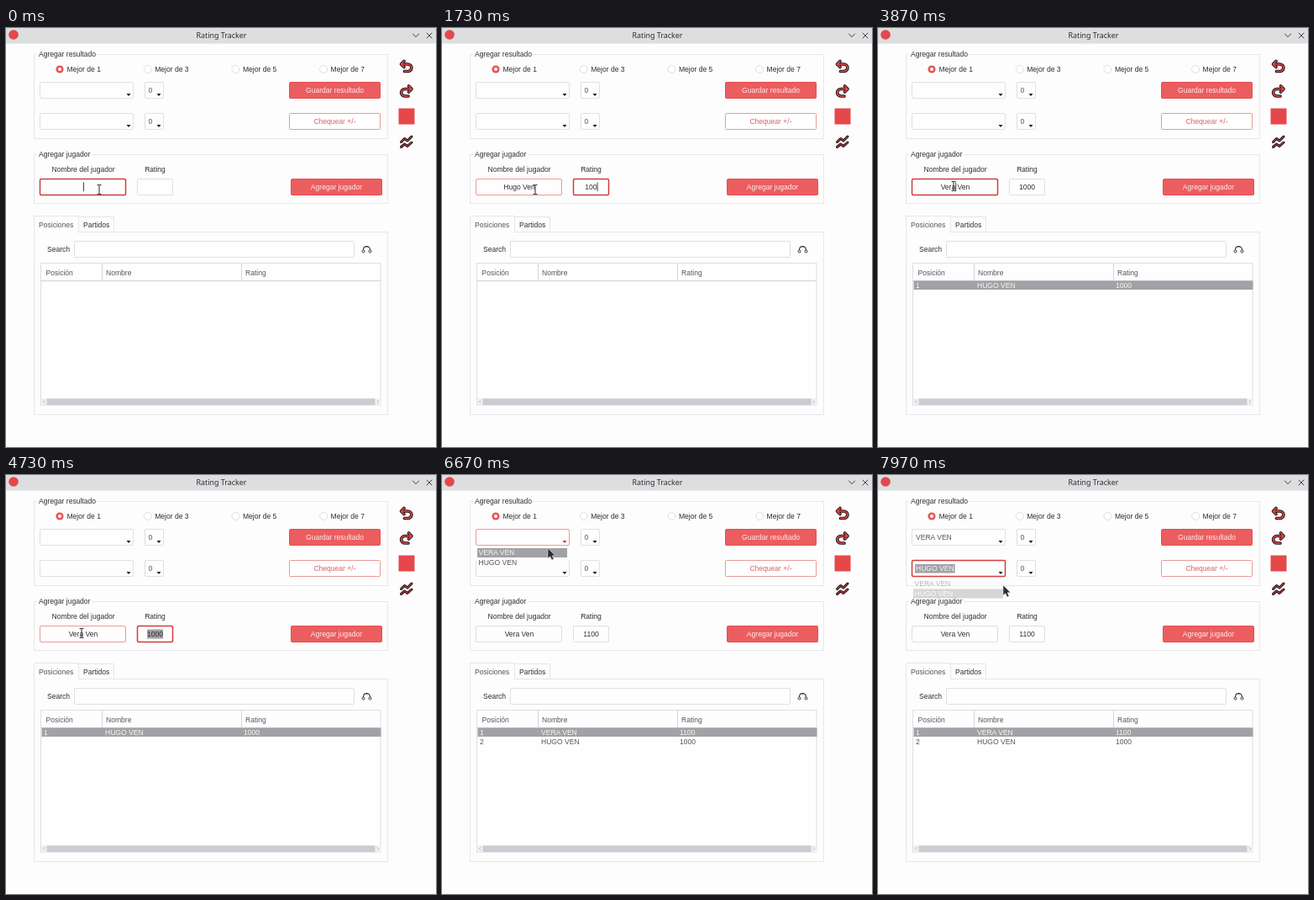
Write an HTML page that moves like this. It is 512 by 498 pixels and loops after 8 s.

```html
<!DOCTYPE html>
<html lang="es">
<head>
<meta charset="utf-8">
<title>Rating Tracker</title>
<style>
html, body { margin: 0; width: 100%; height: 100%; overflow: hidden; background: #fdfdfd; }
svg { display: block; width: 100vw; height: 100vh; }
text { font: 8.55px "Liberation Sans", Arial, sans-serif; fill: #2e2e31; white-space: pre; }
.title { font: 8.9px "Noto Sans", sans-serif; }
.mid { text-anchor: middle; }
.soft { fill: #56565a; }
.inv { fill: #f7f7f8; }
.back { fill: #fdfdfd; }
.line { fill: none; stroke: #e6e6ec; }
.box { fill: #fefefe; stroke: #dfdfe5; }
.hot { fill: #ec5d5f; stroke: #e24f52; }
.sel { fill: #a2a2a6; }
.icon { fill: none; stroke-linecap: round; stroke-linejoin: round; }
</style>
</head>
<body>
<svg id="stage" viewBox="0 0 512 498" preserveAspectRatio="none"></svg>
<script>
const LOOP = 8000;
const ONE = "Hugo Ven", TWO = "Vera Ven";
const ADD_ONE = 2250, ADD_TWO = 6120;
const INK = "#2e2e31", RED = "#e5484b", FOCUS = "#d23c3a", HOVER = "#ea9a98";

const rect = (x, y, w, h, cls, extra = "") =>
  `<rect x="${x}" y="${y}" width="${w}" height="${h}" class="${cls}" ${extra}/>`;
const label = (x, y, s, cls = "", extra = "") =>
  `<text x="${x}" y="${y}" class="${cls}" ${extra}>${s}</text>`;
const path = (d, color, width, extra = "") =>
  `<path class="icon" d="${d}" stroke="${color}" stroke-width="${width}" ${extra}/>`;
const outlined = (d, width) => path(d, "#241416", width + 2) + path(d, RED, width);
const arrow = (x, y, id = "") =>
  `<path id="${id}" d="M${x - 2.5} ${y - 1.5}h5l-2.5 3z" fill="#1c1c1e"/>`;

const group = (y, h, title, w) =>
  rect(33.5, y + .5, 421, h, "line") + rect(37, y - 3, w + 4, 8, "back") +
  label(39, y + 3, title);
const radio = (x, n) => n === 1
  ? `<circle cx="${x}" cy="49" r="4.6" fill="#e95558"/><circle cx="${x}" cy="49" r="2" fill="#fff"/>`
  : `<circle cx="${x}" cy="49" r="4.5" class="box"/>`;
const radios = [1, 3, 5, 7].map((n, i) => {
  const x = 64 + i * 104.7;
  return radio(x, n) + label(x + 8.5, 52, "Mejor de " + n);
}).join("");
const combo = (id, y) =>
  rect(40.5, y + .5, 111, 19, "box", `rx="1.5" id="${id}"`) + arrow(146, y + 15.5, id + "Arrow") +
  rect(44, y + 5, 0, 10.5, "sel", `id="${id}Sel"`) + label(45, y + 13, "", "", `id="${id}Text"`) +
  rect(165.5, y + .5, 22, 19, "box", 'rx="1.5"') + label(169.5, y + 13, "0", "soft") + arrow(182, y + 15.5);
const field = (id, x, w) =>
  rect(x + .5, 179.5, w, 19, "box", `rx="1.5" id="${id}"`) +
  rect(0, 183.5, 0, 11, "sel", `id="${id}Sel"`) +
  label(0, 192, "", "", `id="${id}Text"`) +
  rect(0, 183.5, .9, 10.5, "", `id="${id}Caret" fill="${INK}"`);
const button = (x, y, s, cls, color, id = "") =>
  rect(x + .5, y + .5, 108, 19, cls, `rx="1" id="${id}"`) +
  label(x + 54.5, y + 13, s, "mid", `style="fill:${color}"`);
const row = (id, y) => `<g id="${id}">` +
  [45, 118, 283].map(x => label(x, y, "")).join("") + "</g>";
const popup = (id, y) => `<g id="${id}">` +
  rect(41, y, 109, 25, "back") + rect(42, y + 1, 107, 11, "sel") +
  label(43.5, y + 9, TWO.toUpperCase()) + label(43.5, y + 20.5, ONE.toUpperCase()) + "</g>";
const node = x => `<circle cx="${x}" cy="265.5" r="1.5" fill="#fefefe" stroke="${INK}"/>`;

document.getElementById("stage").innerHTML =
  rect(0, 0, 512, 498, "back") +
  rect(0, 0, 512, 18.5, "", 'fill="#dcdee0"') +
  `<circle cx="9" cy="8" r="5.8" fill="${RED}"/>` +
  label(256.5, 12.3, "Rating Tracker", "title mid") +
  path("M484.5 7l3.5 3.7 3.5-3.7M501 6l6 6M507 6l-6 6", "#404044", 1) +

  group(31, 100, "Agregar resultado", 67) + radios +
  combo("c1", 64) + combo("c2", 101) +
  button(337, 64, "Guardar resultado", "hot", "#fdeeee") +
  button(337, 101, "Chequear +/-", "box", "#dc6264", "check") +

  group(150, 58, "Agregar jugador", 61) +
  label(92, 170.5, "Nombre del jugador", "mid") + label(177.5, 170.5, "Rating", "mid") +
  field("name", 40, 102) + field("rating", 156, 42) +
  button(339, 179, "Agregar jugador", "hot", "#fdeeee", "add") +

  rect(33.5, 242.5, 421, 217, "line") +
  rect(86.5, 224.5, 42, 18, "line") +
  rect(33.5, 223.5, 53, 19.5, "line", 'style="fill:#fdfdfd"') +
  rect(34, 242, 52, 2, "back") +
  label(39, 236.5, "Posiciones", "soft") + label(92, 236.5, "Partidos") +
  label(49, 266, "Search") + rect(81.5, 253.5, 333, 19, "box", 'rx="1.5"') +
  path("M425.5 264c0-6 7.5-6 8 0M428 260h3", INK, 1.1) + node(425.5) + node(433.5) +
  rect(41.5, 279.5, 404.5, 169, "box") + path("M41.5 300.5h404.5M114.5 280v20M280.5 280v20", "#d3d3d9", 1) +
  ["Posición", "Nombre", "Rating"].map((s, i) => label([47.5, 119, 285][i], 294, s, "soft")).join("") +
  rect(42.5, 300.5, 404, 10.5, "sel", 'id="rowSel"') + row("row1", 309) + row("row2", 320) +
  rect(42, 440, 404, 8.5, "", 'fill="#f1f2f3"') + rect(48.5, 440.5, 391, 7.5, "", 'fill="#c9ccd0"') +
  path("M46 442.5l-1.6 1.7 1.6 1.7M442 442.5l1.6 1.7-1.6 1.7", "#a8aab0", .8) +

  outlined("M474 39.5l-3.5 3.5 3.5 3.5M471 43h7c6.5 0 6.5 8.5 0 8.5h-3.5", 1.7) +
  outlined("M479.500 69l3.5 3.5-3.5 3.5M482.5 72.5h-7c-6.5 0-6.5 8.500 0 8.500h3.5".replace(/00\b/g, ""), 1.7) +
  rect(467.5, 95.5, 19, 19, "", `fill="${RED}"`) +
  outlined("M470.5 135.5l4-4 3.5 2.5 5-5M470.5 141.5l4-3.5 3.5 2.5 5-4.5", 1) +

  popup("pop1", 86) + popup("pop2", 123) +
  path("M-2 -5.5h1.5l.5 .5 .5-.5h1.5M0 -5v10M-2 5.5h1.5l.5-.5 .5 .5h1.5", "#242427", 1, 'id="beam"') +
  '<path id="arrow" d="M0 0v12l2.8-2.3 2 4.2 2.2-1-1.9-4.1h3.7z" fill="#2c2c30" stroke="#f4f4f6" stroke-width=".5"/>';

const el = {};
document.querySelectorAll("[id]").forEach(e => el[e.id] = e);
const set = (e, attrs) => { for (const k in attrs) e.setAttribute(k, attrs[k]); };
const show = (e, on) => { e.style.display = on ? "" : "none"; };
const typed = (s, start, step, t) => s.slice(0, Math.max(0, Math.floor((t - start) / step) + 1));

// Each entry is [from time, control holding the keyboard].
const focusSteps = [[0, "name"], [1250, "rating"], [2050, "add"], [2950, "name"],
  [4250, "rating"], [5980, "add"], [6400, "c1"], [7250, "c2"]];

// Pointer stops: time, x, y.
const stops = [[0, 111, 192], [2480, 111, 192], [2740, 97, 186], [2950, 88, 188], [3300, 90, 188],
  [5330, 90, 188], [5840, 229, 165], [5960, 229, 165], [6350, 128, 77], [6480, 128, 77], [6640, 126, 87],
  [6900, 126, 88], [7180, 146, 112], [7350, 146, 112], [7650, 149, 139], [7840, 149, 138], [7950, 149, 131]];

function pointerAt(t) {
  const i = stops.findIndex(s => s[0] > t);
  if (i < 0) return stops[stops.length - 1].slice(1);
  const a = stops[i - 1], b = stops[i];
  let k = (t - a[0]) / (b[0] - a[0]);
  k = k * k * (3 - 2 * k);
  return [a[1] + (b[1] - a[1]) * k, a[2] + (b[2] - a[2]) * k];
}

function drawField(id, cx, value, caretPos, selLen, caretOn) {
  const text = el[id + "Text"];
  text.textContent = value;
  const width = n => n ? text.getSubStringLength(0, n) : 0;
  const left = cx - width(value.length) / 2;
  set(text, { x: left });
  set(el[id + "Sel"], { x: left, width: width(selLen) });
  set(el[id + "Caret"], { x: left + width(caretPos) });
  show(el[id + "Caret"], caretOn && !selLen);
}

function border(id, focused, light) {
  el[id].style.stroke = light ? HOVER : focused ? FOCUS : "";
  el[id].style.strokeWidth = focused && !light ? 1.5 : 1;
}

function drawRow(id, values, selected) {
  show(el[id], values);
  if (!values) return;
  [...el[id].children].forEach((e, i) => {
    e.textContent = values[i];
    e.setAttribute("class", selected ? "inv" : "soft");
  });
}

function drawPopup(id, active, opacity) {
  show(el[id], opacity > 0);
  el[id].style.opacity = opacity;
  const [back, mark, ...items] = el[id].children;
  set(mark, { y: +back.getAttribute("y") + 1 + active * 11.5 });
  items.forEach((e, i) => e.setAttribute("class", active === i ? "inv" : "soft"));
}

const fade = (t, from, to, ms) =>
  t < from ? 0 : t < to ? 1 : Math.max(0, 1 - (t - to) / ms);

function render(t) {
  const focus = focusSteps.filter(s => s[0] <= t).pop()[1];
  const [x, y] = pointerAt(t);
  const inside = (x0, x1) => x > x0 && x < x1 && y > 179 && y < 199;
  const overName = inside(40, 143), overRating = inside(156, 199);

  const first = typed(ONE, 200, 115, t);
  const retype = typed("Vera", 3350, 130, t);
  const name = t < 3350 ? first : retype + " Ven";
  const namePos = t < 3350 ? first.length : retype.length;
  const nameSel = t >= 3050 && t < 3350 ? 4 : 0;
  const rating = t < 4750 ? typed("1000", 1480, 110, t) : typed("1100", 4750, 220, t);
  const ratingSel = t >= 4250 && t < 4750 ? 4 : 0;

  const keyTimes = [0, 200, 1005, 1480, 1810, 3350, 3740, 4750, 5410];
  const lastKey = keyTimes.filter(k => k <= t).pop();
  const blink = (t - lastKey) % 1000 < 500;
  drawField("name", 92, name, namePos, nameSel, blink && focus === "name");
  drawField("rating", 177.5, rating, rating.length, ratingSel, blink && focus === "rating");

  const open1 = fade(t, 6430, 6880, 150), open2 = fade(t, 7280, 7850, 210);
  drawPopup("pop1", 0, open1);
  drawPopup("pop2", t < 7520 ? 0 : 1, open2);
  border("name", focus === "name", overName && focus !== "name");
  border("rating", focus === "rating", overRating && focus !== "rating");
  border("c1", focus === "c1", open1 === 1);
  border("c2", focus === "c2", open2 === 1);
  el.add.style.stroke = focus === "add" ? FOCUS : "";
  el.check.style.stroke = HOVER;
  set(el.c1Arrow, { fill: focus === "c1" ? FOCUS : "#1c1c1e" });

  const a = [ONE.toUpperCase(), "1000"], b = [TWO.toUpperCase(), "1100"];
  const both = t >= ADD_TWO;
  show(el.rowSel, t >= ADD_ONE);
  drawRow("row1", t >= ADD_ONE && ["1", ...(both ? b : a)], true);
  drawRow("row2", both && ["2", ...a], false);

  const picked = t >= 7850;
  el.c1Text.textContent = t >= 6880 ? b[0] : "";
  el.c1Text.setAttribute("class", "soft");
  el.c2Text.textContent = picked ? a[0] : "";
  el.c2Text.setAttribute("class", "inv");
  set(el.c2Sel, { width: picked ? el.c2Text.getComputedTextLength() + 2 : 0 });

  const beam = overName || overRating;
  show(el.beam, beam);
  show(el.arrow, !beam);
  set(beam ? el.beam : el.arrow, { transform: `translate(${x} ${y})` });
}

const start = performance.now();
function tick() {
  render((performance.now() - start) % LOOP);
  requestAnimationFrame(tick);
}
tick();
</script>
</body>
</html>
```
